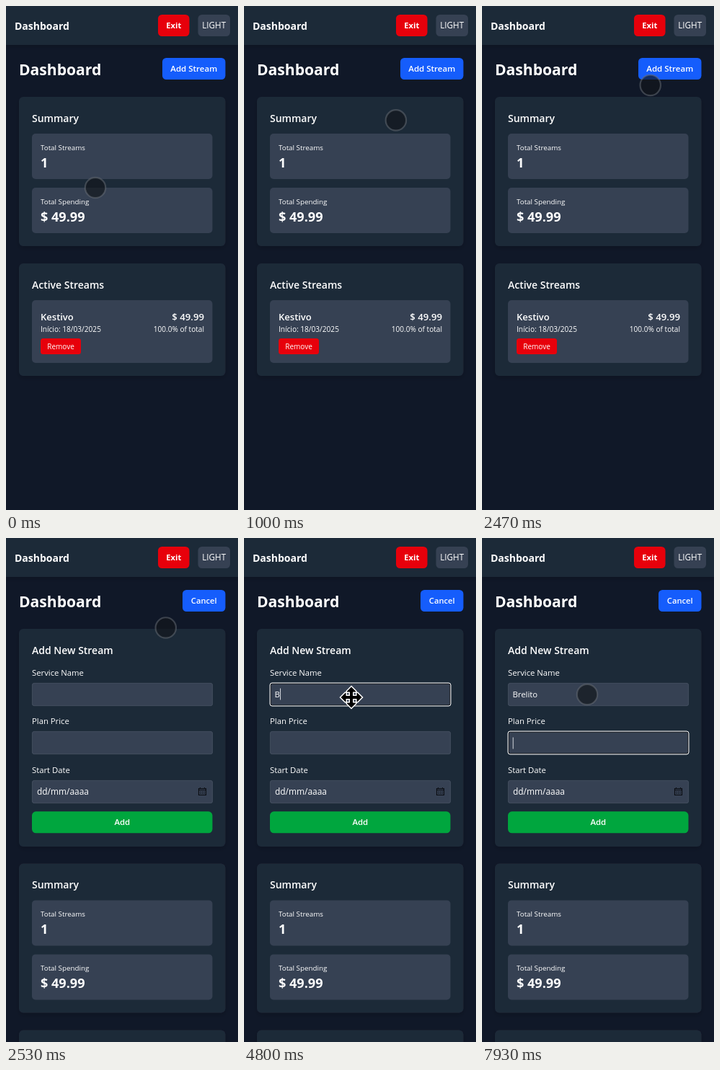
Recreate the animation shown at these times as an HTML page. Size 322x699 px, loop 8000 ms.

```html
<!DOCTYPE html>
<html lang="en">
<head>
<meta charset="utf-8">
<title>Dashboard</title>
<style>
  html, body { margin: 0; width: 100%; height: 100%; overflow: hidden; background: #101828; }
  svg { display: block; width: 100vw; height: 100vh; }
  text { font-family: "Open Sans", "Noto Sans", sans-serif; fill: #fff; white-space: pre; }
</style>
</head>
<body>
<svg id="stage" viewBox="0 0 322 699">
  <defs>
    <filter id="shadow" x="-10%" y="-10%" width="120%" height="125%">
      <feDropShadow dx="0" dy="3" stdDeviation="3" flood-color="#000" flood-opacity=".16"/>
    </filter>
  </defs>
</svg>
<script>
const LOOP = 8000, STEP = 200 / 3;
const NS = "http://www.w3.org/2000/svg";
const C = {
  page: "#101828", card: "#1e2939", tile: "#364153", line: "#4a5565",
  blue: "#155dfc", red: "#e7000b", green: "#00a63e", soft: "#d8dce3"
};

function add(parent, tag, attrs = {}, content) {
  const el = document.createElementNS(NS, tag);
  for (const key in attrs) el.setAttribute(key, attrs[key]);
  if (content !== undefined) el.textContent = content;
  parent.appendChild(el);
  return el;
}
const group = parent => add(parent, "g");
const box = (parent, x, y, width, height, rx, fill, extra) =>
  add(parent, "rect", { x, y, width, height, rx, fill, ...extra });
const label = (parent, x, y, size, weight, content, extra) =>
  add(parent, "text", { x, y, "font-size": size, "font-weight": weight, ...extra }, content);
const card = (parent, y, height) =>
  box(parent, 18, y, 286.5, height, 6, C.card, { filter: "url(#shadow)" });
const show = (el, on) => el.setAttribute("visibility", on ? "visible" : "hidden");

function button(parent, x, y, w, h, fill, content, size, weight, r = 5.5) {
  const g = group(parent);
  box(g, x, y, w, h, r, fill);
  label(g, x + w / 2, y + h / 2 + size * 0.36, size, weight, content, { "text-anchor": "middle" });
  return g;
}

function tile(parent, y, title, value) {
  box(parent, 36, y, 250.5, 63, 5, C.tile);
  label(parent, 48, y + 23, 9.8, 400, title, { fill: C.soft });
  label(parent, 48, y + 47, 18.1, 700, value);
}

function field(parent, y, title) {
  label(parent, 36, y - 10, 11.3, 400, title, { fill: C.soft });
  box(parent, 36.4, y + 0.4, 250.2, 31.2, 2.6, C.tile, { stroke: C.line, "stroke-width": 0.8 });
}

function focusRing(parent, y) {
  const g = group(parent);
  box(g, 37, y + 1, 249, 30, 2, "none", { stroke: "#101010", "stroke-width": 1 });
  box(g, 36, y, 251, 32, 3, "none", { stroke: "#fff", "stroke-width": 1 });
  return g;
}

const caretAt = (parent, x, y) => box(parent, x, y + 8, 0.9, 16, 0, "#e5e7eb");

// Page
const stage = document.getElementById("stage");
box(stage, 0, 0, 322, 699, 0, C.page);

const lists = group(stage);
card(lists, 126, 207);
label(lists, 36, 161, 14, 600, "Summary");
tile(lists, 177, "Total Streams", "1");
tile(lists, 252, "Total Spending", "$ 49.99");
card(lists, 357, 156);
label(lists, 36, 392, 14, 600, "Active Streams");
box(lists, 36, 408, 250.5, 87, 5, C.tile);
label(lists, 48, 436, 13, 600, "Kestivo");
label(lists, 275, 436, 13.2, 600, "$ 49.99", { "text-anchor": "end" });
label(lists, 48, 452, 10.1, 400, "Início: 18/03/2025", { fill: C.soft });
label(lists, 275, 452, 10.1, 400, "100.0% of total", { fill: C.soft, "text-anchor": "end" });
button(lists, 48, 461, 56, 22, C.red, "Remove", 10, 400, 3.5);

const form = group(stage);
card(form, 126, 302);
label(form, 36, 161, 14, 600, "Add New Stream");
field(form, 201, "Service Name");
field(form, 268, "Plan Price");
field(form, 336, "Start Date");
label(form, 43, 356, 11.9, 400, "dd/mm/aaaa");
add(form, "path", {
  d: "M267.5 347.5h10v9h-10zM267.5 349.5h10M269.5 346v1.5M275.5 346v1.5",
  fill: "none", stroke: "#0a0d12", "stroke-width": 1.1
});
add(form, "path", {
  d: "M269.3 352h6.6M269.3 354.3h6.6",
  stroke: "#0a0d12", "stroke-width": 1.1, "stroke-dasharray": "1.4 1.2"
});
button(form, 36, 379.3, 250.5, 30, C.green, "Add", 11.4, 600);
const typed = label(form, 42.5, 221, 11.3, 400, "");
const nameRing = focusRing(form, 201);
const priceRing = focusRing(form, 268);
const nameCaret = caretAt(form, 42.5, 200.5);
const priceCaret = caretAt(form, 42.7, 268.5);

box(stage, 0, 0, 322, 54, 0, C.card, { filter: "url(#shadow)" });
label(stage, 12, 33, 14, 700, "Dashboard");
button(stage, 211, 12, 43.5, 30, C.red, "Exit", 11.2, 700);
button(stage, 266.5, 12, 44.5, 30, C.tile, "LIGHT", 11.7, 400);
label(stage, 18, 96, 21.1, 700, "Dashboard");
const openBtn = button(stage, 217, 72, 87.5, 30, C.blue, "Add Stream", 11.5, 600);
const cancelBtn = button(stage, 245, 72, 59.5, 30, C.blue, "Cancel", 11.2, 600);

// Pointers
const touch = add(stage, "circle", {
  r: 14.2, fill: "#12161c", "fill-opacity": 0.68,
  stroke: "#6a7078", "stroke-opacity": 0.5, "stroke-width": 2.2
});
const mover = add(stage, "g", { transform: "translate(149 221)" });
const arm = "M0 -14.5L6 -8.5V-7.5H2V-2H-2V-7.5H-6V-8.5Z";
const pens = [
  { fill: "#fff", stroke: "#fff", "stroke-width": 3 },
  { fill: "#000" }
];
for (const pen of pens) {
  for (let a = 0; a < 360; a += 90) add(mover, "path", { d: arm, transform: `rotate(${a})`, ...pen });
  box(mover, -2, -2, 4, 4, 0, pen.fill);
}

// Pointer legs: start step, end step, target, ease-in and ease-out powers
const home = [124, 252];
const legs = [
  [0, 13, 197, 179, 1.7, 1],
  [13, 25, 255, 93, 1, 1.5],
  [26, 29, 250, 90, 1, 1],
  [35, 47, 146, 217, 1.45, 2.2]
];

function pointer(step) {
  let [x, y] = home;
  for (const [from, to, tx, ty, a, b] of legs) {
    if (step <= from) break;
    const p = Math.min(1, (step - from) / (to - from));
    const e = 1 - (1 - p ** a) ** b;
    x += (tx - x) * e;
    y += (ty - y) * e;
  }
  return [x, y];
}

const word = "Brelito";
const keys = [72, 79, 83, 88, 90, 96, 97];
const OPEN = 38, FOCUS = 53, NEXT = 119;
const within = (v, a, b) => v >= a && v < b;

function render(t) {
  const step = Math.floor((t + 5) / STEP);
  const open = step >= OPEN;
  lists.setAttribute("transform", `translate(0 ${open ? 325.4 : 0})`);
  form.setAttribute("display", open ? "inline" : "none");
  openBtn.setAttribute("display", open ? "none" : "inline");
  cancelBtn.setAttribute("display", open ? "inline" : "none");

  typed.textContent = word.slice(0, keys.filter(k => step >= k).length);
  const end = typed.textContent ? typed.getComputedTextLength() : 0;
  nameCaret.setAttribute("x", 42.7 + end);

  const inName = within(step, FOCUS, NEXT);
  show(nameRing, inName);
  show(nameCaret, inName && !within(step, 61, 68) && !within(step, 105, 113));
  show(priceRing, step >= NEXT);
  show(priceCaret, step >= NEXT);

  const moving = within(step, 66, 73);
  const [x, y] = pointer(step);
  touch.setAttribute("cx", x);
  touch.setAttribute("cy", y);
  show(touch, !moving);
  show(mover, moving);
}

const start = performance.now();
function tick() {
  render((performance.now() - start) % LOOP);
  requestAnimationFrame(tick);
}
tick();
</script>
</body>
</html>
```
